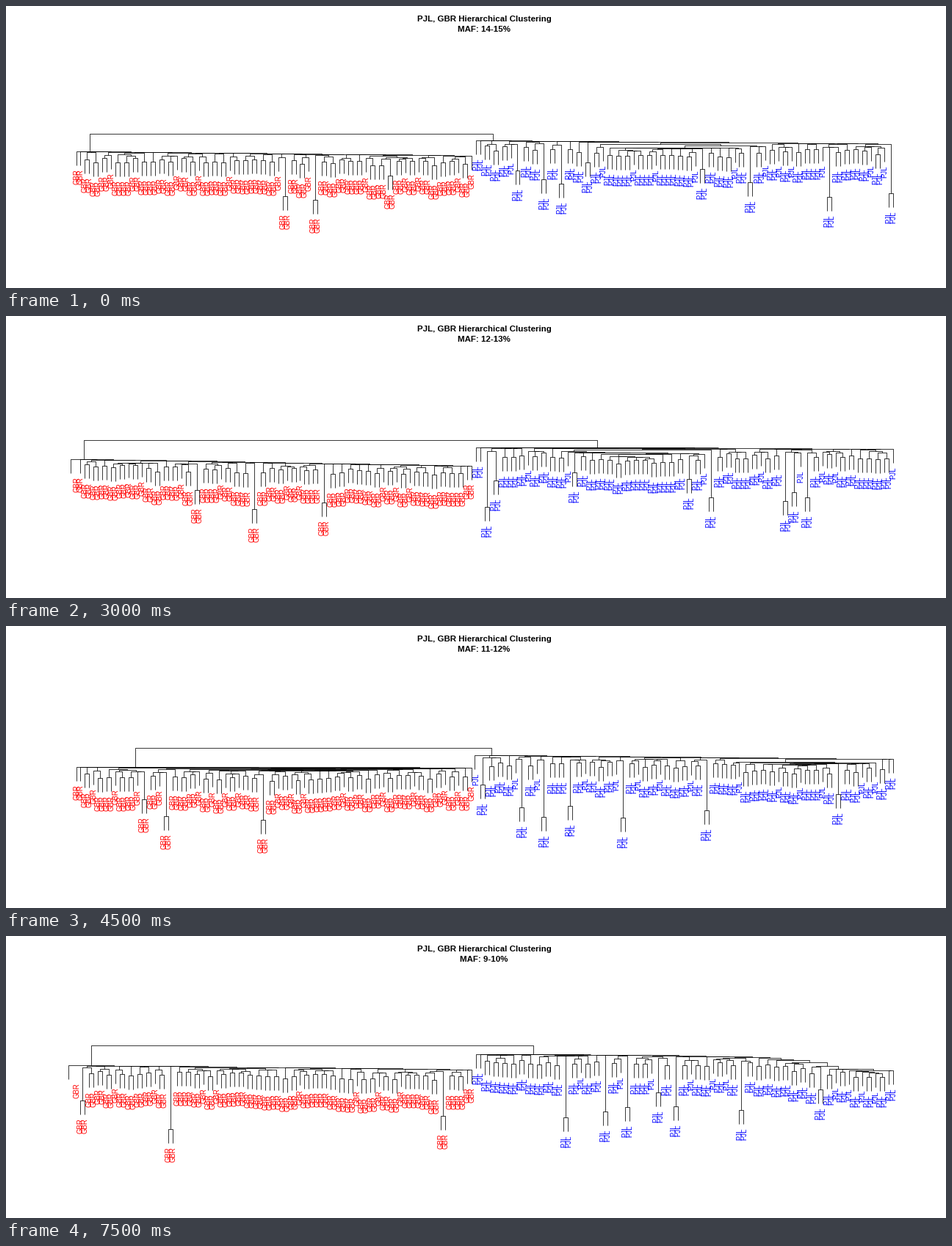
Write a matplotlib script that moves like this. It is 1280 px wide and 384 px high and loops after 8 s.

```python
import random
from itertools import pairwise

import matplotlib.pyplot as plt
import numpy as np
from matplotlib.animation import FuncAnimation
from matplotlib.collections import LineCollection

WIDTH, HEIGHT, DPI = 1280, 384, 100
RED_LEAVES, LEAVES = 91, 187
X0, STEP = 95.5, 5.98          # first leaf and leaf spacing
HANG, LABEL_GAP = 19, 5.5      # leaf length and space above its label

fig = plt.figure(figsize=(WIDTH / DPI, HEIGHT / DPI), dpi=DPI, facecolor="white")
ax = fig.add_axes([0, 0, 1, 1])
ax.set(xlim=(0, WIDTH), ylim=(HEIGHT, 0))
ax.axis("off")
scenes = []


def put_text(x, y, text, pixels, **style):
    return ax.text(x, y, text, fontsize=pixels * 72 / DPI, va="baseline",
                   family="Liberation Sans", **style)


def merge_heights(first, last, spine, deep, rng, bulge=None):
    """Height at which each leaf joins its right neighbour.

    Tight pairs sit every few leaves, with the deep ones at given places;
    between two pairs the heights fall back to the spine.
    """
    gaps = np.arange(first, last)
    base = np.interp(gaps, np.linspace(first, last, len(spine)), spine)
    if bulge:
        start, end = bulge
        across = np.clip((X0 + STEP * gaps - start) / (end - start), 0, 1)
        base += 9 * np.sin(np.pi * across) ** 0.6
    pairs = {round((x - X0) / STEP - 0.5): y for x, y in deep}
    stops = [first, *sorted(pairs), last]
    for a, b in pairwise(stops):
        gap = a + 2
        while gap < b - 1:
            pairs[gap] = base[gap - first] + rng.uniform(7, 15)
            gap += rng.choice((2, 2, 3))

    heights = base.copy()
    for left, right in pairwise(sorted(pairs.items())):
        a, b = left[0], right[0]
        if b - a < 2:
            continue
        valley = rng.randint(a + 1, b - 1)
        for gap in range(a + 1, b):
            k = gap - first
            if gap == valley:
                heights[k] += rng.choice((0, 0, 1, 3, 5))
                continue
            near, y = left if gap < valley else right
            rise = 1 - abs(gap - near) / abs(valley - near)
            heights[k] += rise * min(y - base[k], 10)
    for gap, y in pairs.items():
        heights[gap - first] = y
    return heights


def grow(first, heights, lines, tips, center=None):
    """Split at the highest merge, draw both halves, return the node."""
    cut = int(np.argmin(heights))
    y = heights[cut]
    arms = []
    for start, part in ((first, heights[:cut]),
                        (first + cut + 1, heights[cut + 1:])):
        if len(part):
            arms.append(grow(start, part, lines, tips))
        else:
            tip = (X0 + STEP * start, y + HANG)
            tips.append((start, *tip))
            arms.append(tip)
    (xa, ya), (xb, yb) = arms
    if center is not None:
        if abs(xa - center) > abs(xb - center):
            xb = 2 * center - xa
        else:
            xa = 2 * center - xb
    lines.append([(xa, ya), (xa, y), (xb, y), (xb, yb)])
    return (xa + xb) / 2, y


def add_scene(share, root, red_spine, red_deep, blue_spine, blue_deep, bulge=None):
    y_root, x_red, x_blue = root
    rng = random.Random(share)
    lines, tips = [], []
    red = merge_heights(0, RED_LEAVES - 1, red_spine, red_deep, rng)
    blue = merge_heights(RED_LEAVES, LEAVES - 1, blue_spine, blue_deep, rng, bulge)
    _, y_red = grow(0, red, lines, tips, x_red)
    _, y_blue = grow(RED_LEAVES, blue, lines, tips, x_blue)
    lines.append([(x_red, y_red), (x_red, y_root), (x_blue, y_root), (x_blue, y_blue)])

    artists = [ax.add_collection(LineCollection(lines, colors="black", linewidths=0.55))]
    for leaf, x, y in sorted(tips):
        name, color = ("GBR", "#ff0000") if leaf < RED_LEAVES else ("PJL", "#0000ff")
        artists.append(put_text(x + 3.5, y + LABEL_GAP, name, 9.6, color=color,
                                rotation=90, rotation_mode="anchor", ha="right"))
    artists.append(put_text(651, 35, f"MAF: {share}%", 11.5, weight="bold", ha="center"))
    scenes.append(artists)


put_text(651, 21, "PJL, GBR Hierarchical Clustering", 11.5, weight="bold", ha="center")

add_scene("14-15", (174, 114, 663),
          (198, 204), [(379, 259), (421, 264), (522, 231)],
          (183, 188), [(697, 224), (732, 236), (756, 242), (792, 213), (947, 222),
                       (1013, 240), (1121, 260), (1205, 255)],
          (800, 1005))

add_scene("13-14", (165, 112, 1100),
          (188, 194), [(253, 225), (379, 263), (397, 244)],
          (177, 174.5), [(756, 215), (870, 232), (996, 241), (1056, 245),
                         (1109, 209), (1170, 234), (1187, 226)],
          (675, 860))

add_scene("12-13", (169, 106, 805),
          (195, 204), [(260, 237), (337, 263), (433, 254)],
          (179, 181), [(654, 260), (667, 224), (774, 213), (930, 222), (960, 247),
                       (1062, 252), (1073, 240), (1091, 247)],
          (765, 955))

add_scene("11-12", (166, 176, 661),
          (191.5, 197, 193), [(188, 236), (218, 259), (349, 264)],
          (176, 181), [(649, 216), (703, 247), (732, 260), (768, 245), (840, 261),
                       (954, 251), (1133, 229)],
          (980, 1170))

add_scene("10-11", (156, 171, 671),
          (182, 187), [(290, 263), (331, 229), (451, 254)],
          (168, 172), [(679, 232), (691, 238), (738, 209), (840, 258), (870, 237),
                       (960, 249), (1085, 215)],
          (980, 1170))

add_scene("9-10", (149, 116, 718),
          (176, 182), [(104, 224), (223, 263), (595, 245)],
          (161, 162, 165, 184), [(762, 247), (816, 239), (846, 233), (888, 213),
                                 (912, 232), (1002, 237), (1109, 209)])


def update(frame):
    current = frame // 3
    for number, artists in enumerate(scenes):
        for artist in artists:
            artist.set_visible(number == current)
    return []


update(0)
animation = FuncAnimation(fig, update, frames=16, interval=500, repeat=True,
                          repeat_delay=0, blit=False)
plt.show()
```
